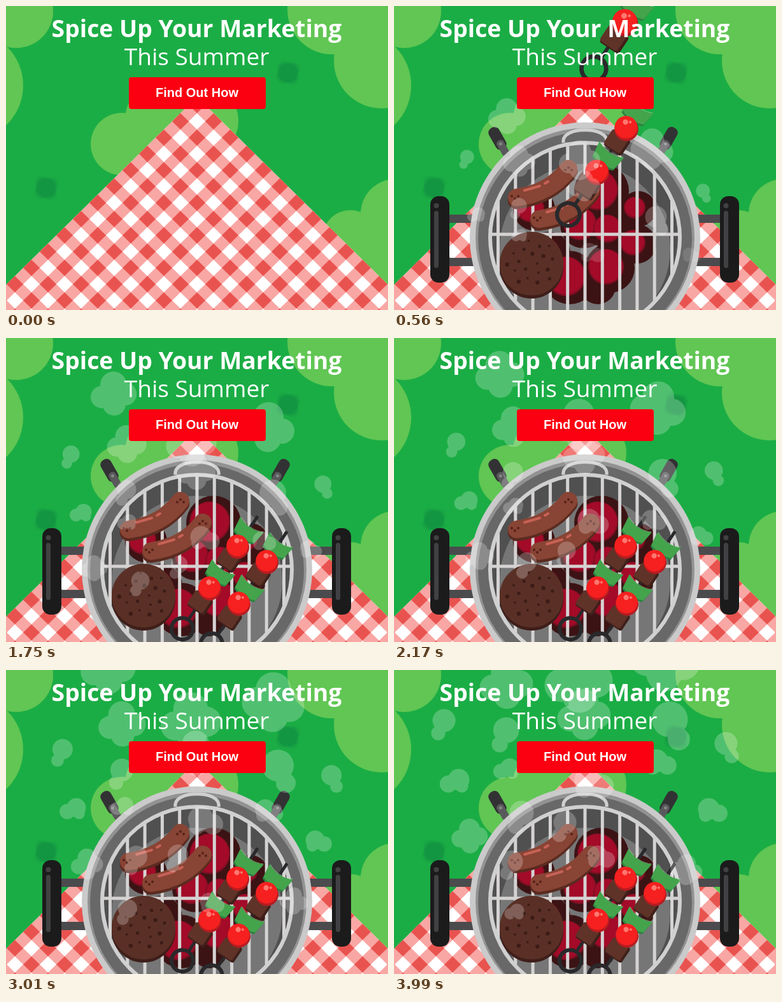
An HTML page with a canvas that plays this animation: 600x478 px, repeating every 4.02 s.

```html
<!DOCTYPE html>
<html lang="en">
<head>
<meta charset="utf-8">
<title>Summer grill</title>
<style>
html, body { margin: 0; width: 100%; height: 100%; overflow: hidden; background: #1bad45; }
canvas, svg { position: absolute; left: 0; top: 0; width: 600px; height: 478px; }
text { fill: #fff; text-anchor: middle; font-family: "Open Sans", sans-serif; }
.button { font: bold 20px "Liberation Sans", sans-serif; }
</style>
</head>
<body>
<canvas id="stage" width="600" height="478"></canvas>
<svg viewBox="0 0 600 478">
  <text x="299.5" y="49" font-size="37.3" font-weight="700">Spice Up Your Marketing</text>
  <text x="299.5" y="93" font-size="37">This Summer</text>
  <rect x="193" y="112" width="215" height="50" rx="4" fill="#fb0010"/>
  <text class="button" x="300" y="143">Find Out How</text>
</svg>
<script>
const LOOP = 4020, STEP = 70, FALL = 2;
const c = document.getElementById('stage').getContext('2d');

function disc(x, y, r, color) {
  c.fillStyle = color;
  c.beginPath();
  c.arc(x, y, r, 0, 7);
  c.fill();
}
function ring(x, y, r, width, color) {
  c.strokeStyle = color;
  c.lineWidth = width;
  c.beginPath();
  c.arc(x, y, r, 0, 7);
  c.stroke();
}
function box(x, y, w, h, color, r = 0) {
  c.fillStyle = color;
  c.beginPath();
  c.roundRect(x, y, w, h, r);
  c.fill();
}
function line(color, width, x0, y0, x1, y1) {
  c.strokeStyle = color;
  c.lineWidth = width;
  c.beginPath();
  c.moveTo(x0, y0);
  c.lineTo(x1, y1);
  c.stroke();
}
function at(x, y, angle, scale, draw) {
  c.save();
  c.translate(x, y);
  c.rotate(angle);
  c.scale(scale, scale);
  draw();
  c.restore();
}

function tuft(x, y) {
  c.fillStyle = 'rgba(14,135,65,.6)';
  c.beginPath();
  for (let i = 0; i < 72; i++) {
    const a = i * Math.PI / 36;
    const r = i % 2 ? 14 : 21 + 3 * Math.cos(4 * a + 2.6);
    c.lineTo(x + r * Math.cos(a), y + r * Math.sin(a));
  }
  c.fill();
}

function cloth() {
  c.save();
  c.transform(13, 12.8, -13, 12.8, 300, 143);
  box(0, 0, 28, 28, '#fff');
  for (let i = 0; i < 28; i += 2) {
    box(i, 0, 1, 28, '#f8a7a4');
    box(0, i, 28, 1, '#f8a7a4');
  }
  for (let u = 0; u < 28; u += 2)
    for (let v = 0; v < 28; v += 2) box(u, v, 1, 1, '#e9534f');
  c.restore();
}

function lawn() {
  const leaf = '#61c653';
  box(0, 0, 600, 478, '#1bad45');
  [[16, 8, 58], [-59, 125, 86], [512, 6, 70], [590, 86, 75], [612, 327, 55],
   [541, 365, 44], [182, 217, 49], [245, 178, 58], [307, 181, 58]]
    .forEach(([x, y, r]) => disc(x, y, r, leaf));
  box(520, 0, 80, 60, leaf);
  box(541, 365, 59, 113, leaf);
  tuft(63, 286);
  tuft(443, 105);
  cloth();
}

function sideHandle(x, barX) {
  box(barX, 328, 45, 13, '#4b4b4d');
  box(barX, 396, 45, 13, '#4b4b4d');
  box(x, 299, 30, 136, '#1b1b1c', 13);
  box(x + 6, 322, 7, 90, '#414143', 3.5);
  disc(x + 9.5, 314, 4, '#414143');
}
function vent(x, angle) {
  at(x, 209, angle, 1, () => {
    box(-9, -20, 18, 38, '#323234', 8);
    box(-6, 3, 12, 27, '#59595b', 5);
    disc(0, 9, 2.5, '#858587');
  });
}

function coals() {
  const glow = [[214, 318, 22], [320, 289, 32], [378, 317, 17], [292, 342, 26],
    [335, 350, 22], [375, 372, 20], [333, 410, 28], [270, 425, 31], [237, 387, 23]];
  for (const [x, y, r] of glow) disc(x + 6, y + 2, r + 11, '#3c1314');
  disc(320, 441, 28, '#3c1314');
  for (const [x, y, r] of glow) {
    disc(x, y, r, '#800e23');
    disc(x, y - 1, r - 2, '#a30b28');
  }
}

function grill() {
  sideHandle(57, 82);
  sideHandle(512, 472);
  vent(163, -.52);
  vent(431, .52);
  disc(300, 364, 181, '#cacaca');
  disc(300, 364, 172, '#929292');
  disc(300, 366, 168, '#686869');
  disc(300, 364, 150, '#505051');
  disc(300, 382, 134, '#767677');
  coals();

  c.save();
  c.beginPath();
  c.arc(300, 364, 150, 0, 7);
  c.clip();
  for (let i = -5; i <= 5; i++) box(297.5 + i * 27.3, 210, 5, 310, '#d5d2d2');
  box(150, 356.5, 300, 5, '#d5d2d2');
  c.restore();
  ring(300, 364, 149, 6, '#d0d0d0');

  c.strokeStyle = '#cfcfcf';
  c.lineWidth = 5;
  c.beginPath();
  c.moveTo(266, 215);
  c.bezierCurveTo(262, 188, 338, 188, 334, 215);
  c.stroke();
}

function sausage() {
  const body = (color, width, y) => {
    c.strokeStyle = color;
    c.lineWidth = width;
    c.beginPath();
    c.moveTo(-41, 21 + y);
    c.quadraticCurveTo(11, 14 + y, 40, -24 + y);
    c.stroke();
  };
  c.lineCap = 'round';
  body('#5b2b20', 29, 4);
  body('#884434', 28, 0);
  line('#c76156', 4, -29, 10, -5, 3);
  line('#c76156', 4, 3, -1, 8, -4);
  for (let i = -1; i < 2; i++) {
    disc(-44 + i * 5, 23 - i * i * 4, 2, '#532219');
    disc(40 + i * 5, -26 + i * i * 4, 2, '#532219');
  }
}

function burger() {
  disc(0, 4, 50, '#3f1e19');
  disc(0, -1, 50, '#5a3026');
  for (let i = 0; i < 19; i++) {
    const a = i * 2.4, r = 9 * Math.sqrt(i + 1);
    disc(r * Math.cos(a), r * Math.sin(a) - 1, 2 + i % 3 * .6, '#3c1c16');
  }
}

function meat(y) {
  box(-15, y - 13, 32, 28, '#40201a', 4);
  box(-16, y - 14, 29, 27, '#5f3328', 4);
}
function tomato(y) {
  disc(1, y + 1, 18, '#b71c20');
  disc(-1, y - 1, 17, '#f5201f');
  disc(-6, y - 7, 4, '#ff7770');
  disc(0, y - 11, 2, '#ff7770');
}
function pepper(y) {
  const slice = (color, h, top) => {
    c.fillStyle = color;
    c.beginPath();
    c.moveTo(-22, top);
    c.quadraticCurveTo(0, top + 11, 22, top);
    c.lineTo(19, top + h);
    c.quadraticCurveTo(0, top + h + 8, -19, top + h);
    c.fill();
  };
  slice('#2c8140', 25, y - 14);
  slice('#44a44c', 22, y - 14);
  slice('#b8e5ad', 2, y - 15);
}
function kebab() {
  c.lineCap = 'butt';
  line('#29292b', 5, 0, -96, 0, 100);
  ring(0, 117, 17, 6, '#29292b');
  meat(67);
  pepper(14);
  tomato(40);
  meat(-14);
  pepper(-66);
  tomato(-39);
}

function drop(t, land, x, y, angle, draw) {
  const rise = Math.max(0, land - t) * FALL;
  if (rise < 620) at(x, y - rise, angle, 1 + rise * .00035, draw);
}
function food(t) {
  drop(t, 350, 234, 280, 0, sausage);
  drop(t, 420, 269, 314, 0, sausage);
  drop(t, 490, 216, 406, 0, burger);
  drop(t, 627, 342, 360, .59, kebab);
  drop(t, 758, 388, 384, .59, kebab);
}

// Each puff at 3 s: x, y, rise per second, size.
const puffs = [
  [89, 125, 46, 16], [106, 217, 45, 15], [127, 306, 45, 17],
  [511, 166, 51, 16], [490, 268, 50, 15], [452, 364, 50, 15],
  [182, 158, 64, 18], [183, 213, 60, 13], [160, -2, 72, 29],
  [205, 294, 70, 17], [195, 448, 70, 10], [182, 86, 65, 25],
  [270, 291, 52, 16], [312, 235, 62, 20], [290, 82, 66, 32],
  [427, 151, 74, 25], [412, 220, 78, 16], [420, 52, 71, 33],
  [191, 376, 76, 15], [323, 365, 74, 14], [298, 132, 62, 25]
];
const lobes = [
  [[0, 0, 1], [.5, 1.1, .62]],
  [[-.3, 0, 1], [.65, .4, .8], [-.6, .6, .6]],
  [[0, -.6, .85], [-.75, 0, .75], [.75, .2, .72], [-.05, .65, .75]]
];

function smoke(t) {
  const s = t / 1000 - 3;
  puffs.forEach(([x, y, speed, size], i) => {
    const birth = Math.max(.28, 3 + (y - 395) / speed);
    const fade = Math.min(1, (t / 1000 - birth) * 5);
    if (fade <= 0) return;
    const r = size * (1 + .13 * s), flip = x < 300 ? -1 : 1;
    const cx = x + (x - 300) * .05 * s, cy = y - speed * s;
    c.fillStyle = `rgba(255,255,255,${.23 * fade})`;
    c.beginPath();
    for (const [dx, dy, k] of lobes[i % 3]) {
      const px = cx + flip * dx * r, py = cy + dy * r;
      c.moveTo(px + k * r, py);
      c.arc(px, py, k * r, 0, 7);
    }
    c.fill();
  });
}

// Two steps, then a hold, repeated; the last step is not held.
function stepped(t) {
  let n = Math.floor(t / STEP);
  if (n % 3 === 0 && n > 0 && n < 57) n--;
  return n * STEP;
}

function frame() {
  const t = stepped(performance.now() % LOOP);
  lawn();
  if (t > 0) {
    drop(t, 280, 0, 0, 0, grill);
    food(t);
    smoke(t);
  }
  requestAnimationFrame(frame);
}
frame();
</script>
</body>
</html>
```
